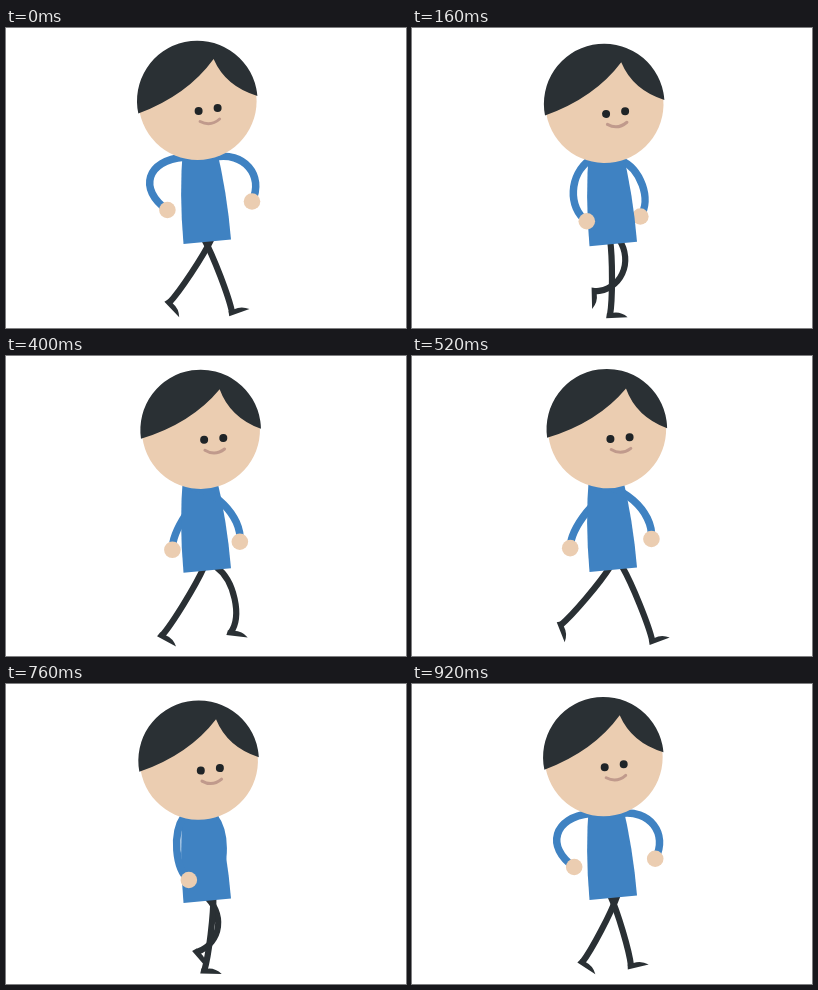
An HTML page with a canvas for the animation above (960 ms loop, 400x300 px).

```html
<!DOCTYPE html>
<html>
<head>
<meta charset="utf-8">
<style>
  html, body { margin: 0; width: 100%; height: 100%; overflow: hidden; background: #fff; }
  canvas { display: block; }
</style>
</head>
<body>
<canvas id="stage" width="400" height="300"></canvas>
<script>
const ctx = document.getElementById('stage').getContext('2d');
const LOOP = 960, STEP = 40, LEG_LENGTH = 72;
const SKIN = '#ebcdb1', BLUE = '#3f82c2', DARK = '#2a3034', EYE = '#1f2427', MOUTH = '#c09a8c';
const { PI, cos, sin } = Math;

const torso = new Path2D('M177 120 L210 120 Q221 165 225 213 L177.5 217.5 Q173 168 177 120 Z');
const foot = new Path2D('M-4 3 L17.5 3 Q11 -3 3 -2 L-3 -2 Z');
const smile = new Path2D('M2.5 20.5 Q13 26 22 18');
const hair = new Path2D();
hair.arc(-0.3, 0, 60.3, PI - 0.21, -0.085);
hair.quadraticCurveTo(28, -14.5, 16, -42);
hair.quadraticCurveTo(-10, -6, -59.3, 12.6);

function fill(color, path) {
  ctx.fillStyle = color;
  ctx.fill(path);
}

function disc(x, y, r, color) {
  ctx.beginPath();
  ctx.arc(x, y, r, 0, 2 * PI);
  ctx.fillStyle = color;
  ctx.fill();
}

// Run paint in a moved and turned coordinate system
function placed(x, y, angle, paint) {
  ctx.save();
  ctx.translate(x, y);
  ctx.rotate(angle);
  paint();
  ctx.restore();
}

// Soft tube whose middle bows sideways by bend pixels
function limb(x, y, endX, endY, bend, width, color) {
  const dx = endX - x, dy = endY - y;
  const push = bend / 0.75 / Math.hypot(dx, dy);
  const control = k => [x + dx * k + dy * push, y + dy * k - dx * push];
  ctx.beginPath();
  ctx.moveTo(x, y);
  ctx.bezierCurveTo(...control(0.25), ...control(0.8), endX, endY);
  ctx.lineWidth = width;
  ctx.strokeStyle = color;
  ctx.stroke();
}

function arm(x, y, handX, handY, bend) {
  limb(x, y, handX, handY, bend, 7.5, BLUE);
  disc(handX, handY, 8.3, SKIN);
}

// Phase 0 puts the foot furthest forward; it slides back, lifts and returns
function leg(hipX, backX, phase) {
  const hipY = 211;
  const stride = Math.abs(1 - 2 * (phase / (2 * PI) % 1));
  const lift = ((1 - cos(phase - 1.08)) / 2) ** 1.6;
  const x = backX + 84 * stride, y = 287 - 24 * lift;
  const reach = Math.hypot(x - hipX, y - hipY);
  const bend = Math.sqrt(Math.max(4, 3 / 8 * reach * (LEG_LENGTH - reach)));
  const angle = 1.57 * lift - 0.59 * Math.max(0, cos(phase + 0.45));
  limb(hipX, hipY, x, y, bend, 6.2, DARK);
  placed(x, y, angle, () => fill(DARK, foot));
}

function head(x, y, turn) {
  placed(x, y, turn * 0.07, () => {
    disc(0, 0, 59, SKIN);
    fill(DARK, hair);
    ctx.translate(turn * 3, -turn * 0.6);
    disc(1, 10, 4, EYE);
    disc(20, 7, 4, EYE);
    ctx.lineWidth = 3;
    ctx.lineCap = 'round';
    ctx.strokeStyle = MOUTH;
    ctx.stroke(smile);
  });
}

function draw(time) {
  const phase = 2 * PI * time / LOOP;
  const swing = cos(phase), bounce = cos(2 * phase);
  const shoulderY = 131 - 1.7 * bounce;

  ctx.fillStyle = '#fff';
  ctx.fillRect(0, 0, 400, 300);
  arm(208, shoulderY, 202 + 44 * swing + 5 * sin(phase), 189.5 - 9 * swing - 7 * bounce, 5 + 15 * swing);
  leg(198, 142, phase);
  leg(208 - 2.5 * swing, 159, phase + 2.98);
  placed(0, -1.6 * bounce, 0, () => fill(BLUE, torso));
  arm(178, shoulderY, 197 - 40 * swing + 4.4 * bounce, 189.5 - 7.5 * bounce, -4 - 22 * swing);
  head(193.4 - 1.8 * swing, 75 - 2 * bounce, (1 - swing) / 2);
}

function tick() {
  draw(Math.floor(performance.now() % LOOP / STEP) * STEP);
  requestAnimationFrame(tick);
}
tick();
</script>
</body>
</html>
```
